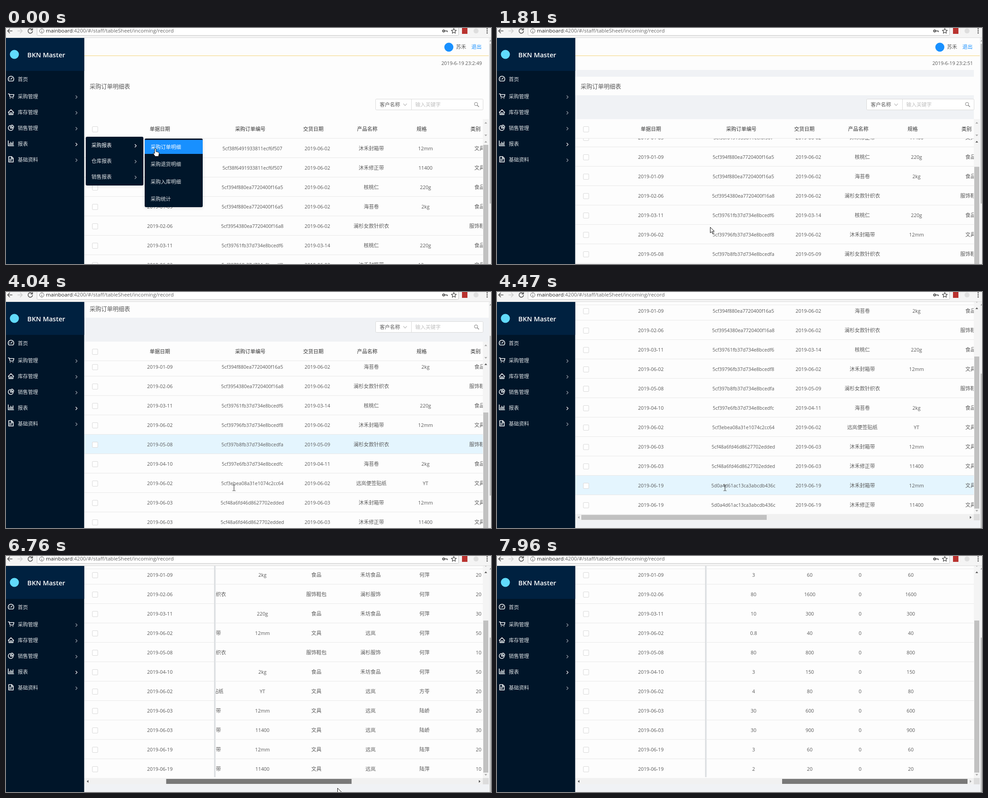
Write an HTML page that moves like this. It is 1070x523 px and loops after 8 s.

```html
<!DOCTYPE html>
<html lang="zh-CN">
<head>
<meta charset="utf-8">
<title>采购订单明细表</title>
<style>
  html, body { margin: 0; width: 100%; height: 100%; overflow: hidden; background: #fff; }
  svg { display: block; width: 1070px; height: 523px; }
  text { font: 10.8px "Open Sans", "Noto Sans CJK SC", "Noto Sans CJK", sans-serif; fill: #595959; white-space: pre; }
  .cjk { font-size: 11.2px; }
  .mid { text-anchor: middle; }
  .id { font-size: 10.5px; }
  .head { fill: #303030; }
  .title { font-size: 12.75px; }
  .url { font-size: 11.5px; fill: #666; }
  .brand { font-size: 14.6px; font-weight: 600; fill: #fff; }
  .nav { fill: #dfe3e6; }
  .on { fill: #fff; }
  .link { fill: #1890ff; }
  .hint { fill: #bfbfbf; }
  .line { fill: none; stroke-width: 1.2; stroke-linecap: round; stroke-linejoin: round; }
  .bold { stroke-width: 1.6; }
</style>
</head>
<body>
<svg id="stage" viewBox="0 0 1070 523" xmlns="http://www.w3.org/2000/svg"></svg>
<script>
const LOOP = 8000, TOP = 22, ROW = 43, BODY_TOP = 245;
const PAPER = '#fdfdfd', NAVY = '#001529';

const rect = (x, y, w, h, fill, more = '') =>
  `<rect x="${x}" y="${y}" width="${w}" height="${h}" fill="${fill}" ${more}/>`;
const circle = (x, y, r, fill, more = '') =>
  `<circle cx="${x}" cy="${y}" r="${r}" fill="${fill}" ${more}/>`;
const line = (d, stroke, cls = '') => `<path class="line ${cls}" d="${d}" stroke="${stroke}"/>`;
// y is the middle of the text
const text = (x, y, str, cls = '', drop = 4.1) => `<text x="${x}" y="${y + drop}" class="${cls}">${str}</text>`;
const cjk = (x, y, str, cls = '') => text(x, y, str, 'cjk ' + cls, 4.3);
const chevron = (x, y, stroke) => line(`M${x - 1.5} ${y - 3}l3 3-3 3`, stroke);
const checkbox = y => rect(190.5, y - 6, 12, 12, '#fff', 'rx="1.5" stroke="#d9d9d9"');
const triangle = (x, y, turn, id = '') =>
  `<path ${id && `id="${id}"`} d="M-3 1.8L0-1.8L3 1.8z" fill="#a3a3a3" transform="translate(${x} ${y}) rotate(${turn})"/>`;

const goods = {
  box: ['沐禾封箱带', '12mm', '文具', '远岚'],
  fix: ['沐禾修正带', '11400', '文具', '远岚'],
  nut: ['核桃仁', '220g', '食品', '禾坊食品'],
  sea: ['海苔卷', '2kg', '食品', '禾坊食品'],
  top: ['澜杉女款针织衣', '', '服饰鞋包', '澜杉服饰'],
  tag: ['远岚便签贴纸', 'YT', '文具', '远岚']
};
const orders = `
01-03 5cf38f6491933811ecf6f507 06-02 box 何萍 20 3
01-03 5cf38f6491933811ecf6f507 06-02 fix 何萍 10 2
01-09 5cf394f880ea7720400f16a5 06-02 nut 何萍 30 10
01-09 5cf394f880ea7720400f16a5 06-02 sea 何萍 20 3
02-06 5cf3954380ea7720400f16a8 06-02 top 何萍 20 80
03-11 5cf39761fb37d734e8bcedf6 03-14 nut 何萍 30 10
06-02 5cf39796fb37d734e8bcedf8 06-02 box 何萍 50 0.8
05-08 5cf397b8fb37d734e8bcedfa 05-09 top 何萍 10 80
04-10 5cf397e6fb37d734e8bcedfc 04-11 sea 何萍 50 3
06-02 5cf3ebea08a31e1074c2cc64 06-02 tag 方苓 20 4
06-03 5cf48a6fd46d8627702edded 06-03 box 陆峤 20 30
06-03 5cf48a6fd46d8627702edded 06-03 fix 陆峤 30 30
06-19 5d0a4d61ac13ca3abcdb436c 06-19 box 陆萍 20 3
06-19 5d0a4d61ac13ca3abcdb436c 06-19 fix 陆萍 10 2`.trim().split('\n').map(s => s.split(' '));

const columns = [543.5, 687, 806, 925.5, 1044.5, 1164, 1283, 1402.5, 1518, 1642, 1753, 1865];
const rowY = i => BODY_TOP + i * ROW + 22;

const fixedCells = orders.map(([date], i) =>
  checkbox(rowY(i) + .5) + text(339.5, rowY(i), '2019-' + date, 'mid')).join('');

const movingCells = orders.map(([, id, due, key, person, count, price], i) =>
  [id, '2019-' + due, ...goods[key], person, count, price, count * price, 0, count * price]
    .map((value, c) => text(columns[c], rowY(i), value,
      'mid ' + (c === 0 ? 'id' : /[\u4e00-\u9fff]/.test(value) ? 'cjk' : ''))).join('')).join('');

const rowLines = orders.map((_, i) => rect(173, BODY_TOP + (i + 1) * ROW - 1, 879, 1, '#e8e8e8')).join('');

const table = `
  ${rect(173, 202, 879, 506, PAPER)}
  ${checkbox(224.5)}
  ${[[339.5, '单据日期'], [539, '采购订单编号'], [678, '交货日期'], [797, '产品名称'], [917, '规格'], [1036, '类别']]
    .map(([x, s]) => cjk(x, 224, s, 'mid head')).join('')}
  ${rect(173, 244, 879, 1, '#e8e8e8')}
  <g clip-path="url(#bodyClip)">
    <g id="rows">
      <rect id="hover" x="173" width="879" height="42"/>
      ${rowLines}${fixedCells}
    </g>
    <g clip-path="url(#moveClip)"><g id="cells">${movingCells}</g></g>
  </g>
  <rect id="shade" x="459" y="202" width="4" height="504" fill="url(#shadeFill)"/>
  ${rect(1052, 202, 13, 507, '#f4f4f4')}
  ${triangle(1058.5, 210, 0)}${triangle(1058.5, 238, 180)}
  ${triangle(1058.5, 252, 0, 'up')}${triangle(1058.5, 701, 180)}
  <rect id="thumbY" x="1053" width="11" height="337" fill="#c1c1c1"/>
  ${rect(173, 708, 879, 14, '#f1f1f1')}${rect(1052, 708, 13, 14, '#dcdcdc')}
  ${triangle(180, 715.5, -90, 'left')}${triangle(1045, 715.5, 90, 'right')}
  <rect id="thumbX" y="710" width="409" height="11"/>`;

const page = `
  ${rect(173, TOP, 893, 730, '#f0f2f5')}
  ${rect(173, TOP, 892, 71, PAPER)}${rect(173, 61, 892, 1, '#f3d277')}
  ${rect(173, 108, 892, 41, PAPER)}
  <g id="plain">${rect(173, 93, 879, 109, PAPER)}</g>
  <g id="edge">${rect(1052, 93, 13, 109, PAPER)}</g>
  ${circle(977, 42.5, 10, '#1890ff')}
  ${cjk(1004, 42, '苏禾', 'mid')}${cjk(1038, 42, '退出', 'mid link')}
  <text id="clock" x="1050" y="82" text-anchor="end"></text>
  ${text(184.5, 129, '采购订单明细表', 'title', 4.7)}
  ${rect(815.5, 157.5, 237, 24, '#fff', 'rx="2" stroke="#d9d9d9"')}${rect(894, 158, 1, 24, '#d9d9d9')}
  ${cjk(847, 170, '客户名称', 'mid')}${line('M877 168l3.5 4 3.5-4', '#bfbfbf')}
  ${cjk(903, 170, '输入关键字', 'hint')}
  ${circle(1037, 168.5, 3.6, 'none', 'stroke="#777"')}${line('M1040 171.5l3 3', '#777')}
  ${table}`;

const nav = [
  ['首页', 113.5, 'M6.5 117.5a6.3 6.3 0 1 1 9 0zM11 113.5l2.5-3M7.5 113h.5'],
  ['采购管理', 152, 'M5 146h2l2 7h7l1.5-5.5h-10M9 156h.6M15 156h.6'],
  ['库存管理', 187, 'M5 187l6-6 6 6M6.5 186v6h9v-6M9.5 192v-4h3v4'],
  ['销售管理', 222, 'M10 216a5.5 5.5 0 1 0 6 6h-6zM12.5 215v5h4.5a5 5 0 0 0-4.5-5z'],
  ['报表', 257, 'M5 250v11h12M8 259v-3M10.5 259v-6M13 259v-4M15.5 259v-7'],
  ['基础资料', 292, 'M6 285h6.5l3.5 3.5v8.5h-10zM12 285v4h4M8 291h5M8 294h4']
];
const sidebar = rect(0, TOP, 172.5, 501, NAVY) + rect(0, TOP, 172.5, 73, '#002140') +
  circle(18.5, 58.5, 10, '#61dafb') + text(47, 60, 'BKN Master', 'brand', 5.3) +
  nav.map(([label, y, icon], i) => line(icon, '#f2f4f5', 'bold') + cjk(26, y, label, 'nav') +
    (i ? chevron(155.5, y + 1, label === '报表' ? '#fff' : '#9aa4ad') : '')).join('');

const menus = `<g id="menus">
  ${rect(176, 241, 127, 108, NAVY, 'rx="3" filter="url(#soft)"')}
  ${['采购报表', '仓库报表', '销售报表'].map((s, i) =>
    cjk(188.5, 260 + i * 35, s, i ? 'nav' : 'on') + chevron(286, 261 + i * 35, i ? '#9aa4ad' : '#fff')).join('')}
  ${rect(306, 245, 128, 152, NAVY, 'rx="3" filter="url(#soft)"')}
  ${rect(306, 248, 128, 31, '#1890ff')}
  ${['采购订单明细', '采购退货明细', '采购入库明细', '采购统计'].map((s, i) =>
    cjk(319, 264 + i * 38.1, s, i ? 'nav' : 'on')).join('')}
</g>`;

const toolbar = rect(0, 0, 1070, TOP, '#f4f4f4') + rect(0, TOP - 1, 1070, 1, '#dcdcdc') +
  rect(68.5, -10, 930, 26.5, '#fff', 'rx="2" stroke="#c4c4c4"') +
  line('M13.5 6.5h-10M8 2l-4.5 4.5 4.5 4.5', '#555', 'bold') +
  line('M26 6.5h10M31.5 2l4.5 4.5-4.5 4.5', '#ccc', 'bold') +
  line('M57.5 3.5a5 5 0 1 0 1 4M58.5 1v3.5h-3.5', '#555', 'bold') +
  circle(79, 6.5, 4.8, 'none', 'stroke="#555"') + line('M79 6.5v2.5M79 4v.1', '#555') +
  text(88, 6.5, '<tspan fill="#222">mainboard</tspan>:4200/#/staff/tableSheet/incoming/record', 'url', 3.7) +
  circle(965.5, 6.5, 2.2, 'none', 'stroke="#444" stroke-width="1.8"') + line('M968 6.5h5.5v2', '#444', 'bold') +
  line('M988 1l1.6 3.7 4 .3-3 2.7.9 4-3.5-2.2-3.5 2.2.9-4-3-2.7 4-.3z', '#444') +
  rect(1006, 0, 12, 13, '#b9322f') + circle(1037, 6.5, 5.5, '#dedede') +
  [2, 6.5, 11].map(y => circle(1061.5, y, 1.4, '#555')).join('');

const pointers = `<g id="pointer">
  <path data-kind="arrow" d="M.5.5v12.5l3-2.7 2 4.5 2-.9-2-4.4h4z" fill="#fff" stroke="#111"/>
  <path data-kind="beam" d="M-3-6.5h2l1 1 1-1h2M0-5.5v11M-3 6.5h2l1-1 1 1h2" fill="none" stroke="#222"/>
  <path data-kind="hand" d="M-3-8q1.5-1.5 3 0v6l5 1.2q2 .6 1.7 2.8l-1.2 6.5h-7.5l-4.2-6.5q.5-2 2.2-.8l1 1z" fill="#fff" stroke="#111"/>
  <g id="busy">${circle(10.5, 1.5, 4.6, '#8ccbf5', 'stroke="#1583dd" stroke-width="2.4"')}</g>
</g>`;

const stage = document.getElementById('stage');
stage.innerHTML = `<defs>
  <clipPath id="viewClip">${rect(172, TOP, 898, 501, '#000')}</clipPath>
  <clipPath id="bodyClip">${rect(173, BODY_TOP, 879, 463, '#000')}</clipPath>
  <clipPath id="moveClip">${rect(459, BODY_TOP, 593, 463, '#000')}</clipPath>
  <linearGradient id="shadeFill"><stop stop-color="#d5d8db"/><stop offset="1" stop-color="#eceef0"/></linearGradient>
  <filter id="soft"><feDropShadow dx="0" dy="1.5" stdDeviation="3" flood-opacity=".13"/></filter></defs>
  ${rect(0, 0, 1070, 523, PAPER)}
  <g clip-path="url(#viewClip)"><g id="page">${page}</g></g>
  ${rect(1066, TOP, 4, 501, '#f1f1f1')}${triangle(1069.5, 28, 0)}
  <rect id="thumbPage" x="1067" width="3" height="354" fill="#c1c1c1"/>
  ${sidebar}${menus}${pointers}${toolbar}`;

// Each track holds a value from its time until the next entry.
const tracks = {
  second: [[0, 49], [263, 50], [1250, 51], [2210, 52], [3050, 53], [4040, 54]],
  menus: [[0, 1], [692, .5], [835, 0]],
  hover: [[0, -1], [978, 4], [1250, -1], [2210, 7], [4470, 12], [5500, -1]],
  bodyY: [[0, 0], [1661, 20], [1799, 67], [1936, 100], [2073, 130], [2210, 138]],
  pageY: [[0, 0], [4040, 92], [4190, 216]],
  thumb: [[0, 0], [6200, 40], [6350, 82], [6500, 120], [6620, 144], [6760, 167.4], [6890, 192], [7020, 224],
    [7150, 259], [7270, 294], [7400, 334], [7530, 374], [7660, 409], [7810, 429], [7960, 443]],
  pointer: [[0, 331, 276, 'hand'], [120, 336, 288, 'hand'], [263, 348, 310, 'hand'], [406, 366, 338, 'hand'],
    [549, 386, 368, 'hand'], [692, 404, 402, 'arrow'], [835, 416, 424, 'arrow'], [978, 423, 438, 'arrow'],
    [1250, 431, 513, 'arrow'], [1387, 444, 486, 'arrow'], [1524, 458, 460, 'arrow'], [1661, 470, 441, 'arrow'],
    [3050, 477, 437, 'beam'], [3170, 484, 434, 'beam'], [3480, 494, 434, 'beam'], [3630, 503, 434, 'beam'],
    [5090, 520, 452, 'beam'], [5220, 540, 471, 'beam'], [5500, 545, 490, 'arrow'], [5643, 548, 500, 'arrow'],
    [6200, 588, 503, 'arrow'], [6350, 640, 507, 'arrow'], [6500, 682, 510, 'arrow'], [6620, 708, 512, 'arrow'],
    [6760, 731, 514, 'arrow'], [6890, 758, 518, 'arrow'], [7020, 790, 530, 'arrow']]
};
const hold = (track, t) => track.filter(key => key[0] <= t).pop().slice(1);

const el = Object.fromEntries([...stage.querySelectorAll('[id]')].map(node => [node.id, node]));
const kinds = stage.querySelectorAll('[data-kind]');
const move = (node, x, y) => node.setAttribute('transform', `translate(${x} ${y})`);
const show = (node, on) => { node.style.display = on ? '' : 'none'; };
const arrowFill = (node, on) => node.setAttribute('fill', on ? '#505050' : '#a3a3a3');

function draw(t) {
  const [second, menuAlpha, hover, bodyY, pageY, thumb] =
    ['second', 'menus', 'hover', 'bodyY', 'pageY', 'thumb'].map(name => hold(tracks[name], t)[0]);
  const [x, y, kind] = hold(tracks.pointer, t);

  el.clock.textContent = `2019-6-19 23:2:${second}`;
  el.menus.style.opacity = menuAlpha;
  show(el.plain, t < 120);
  show(el.edge, pageY === 0);

  move(el.page, 0, -pageY);
  el.thumbPage.setAttribute('y', 35 + pageY * .675);
  move(el.rows, 0, -bodyY);
  move(el.cells, -thumb * 952 / 443, -bodyY);
  el.thumbY.setAttribute('y', 259 + bodyY * 100 / 138);
  el.thumbX.setAttribute('x', 186 + thumb);
  el.thumbX.setAttribute('fill', t < 5500 ? '#c1c1c1' : t < 5643 ? '#a8a8a8' : '#787878');
  arrowFill(el.up, bodyY > 0);
  arrowFill(el.left, thumb > 0);
  arrowFill(el.right, thumb < 443);
  show(el.shade, thumb > 0);

  show(el.hover, hover >= 0);
  el.hover.setAttribute('y', BODY_TOP + hover * ROW);
  el.hover.setAttribute('fill', t < 3050 ? '#ebf8fe' : '#e4f5fe');

  move(el.pointer, x, y);
  kinds.forEach(node => show(node, node.dataset.kind === kind));
  show(el.busy, t >= 5929 && t < 6200);
}

const start = performance.now();
function tick() {
  draw((performance.now() - start) % LOOP);
  requestAnimationFrame(tick);
}
tick();
</script>
</body>
</html>
```
